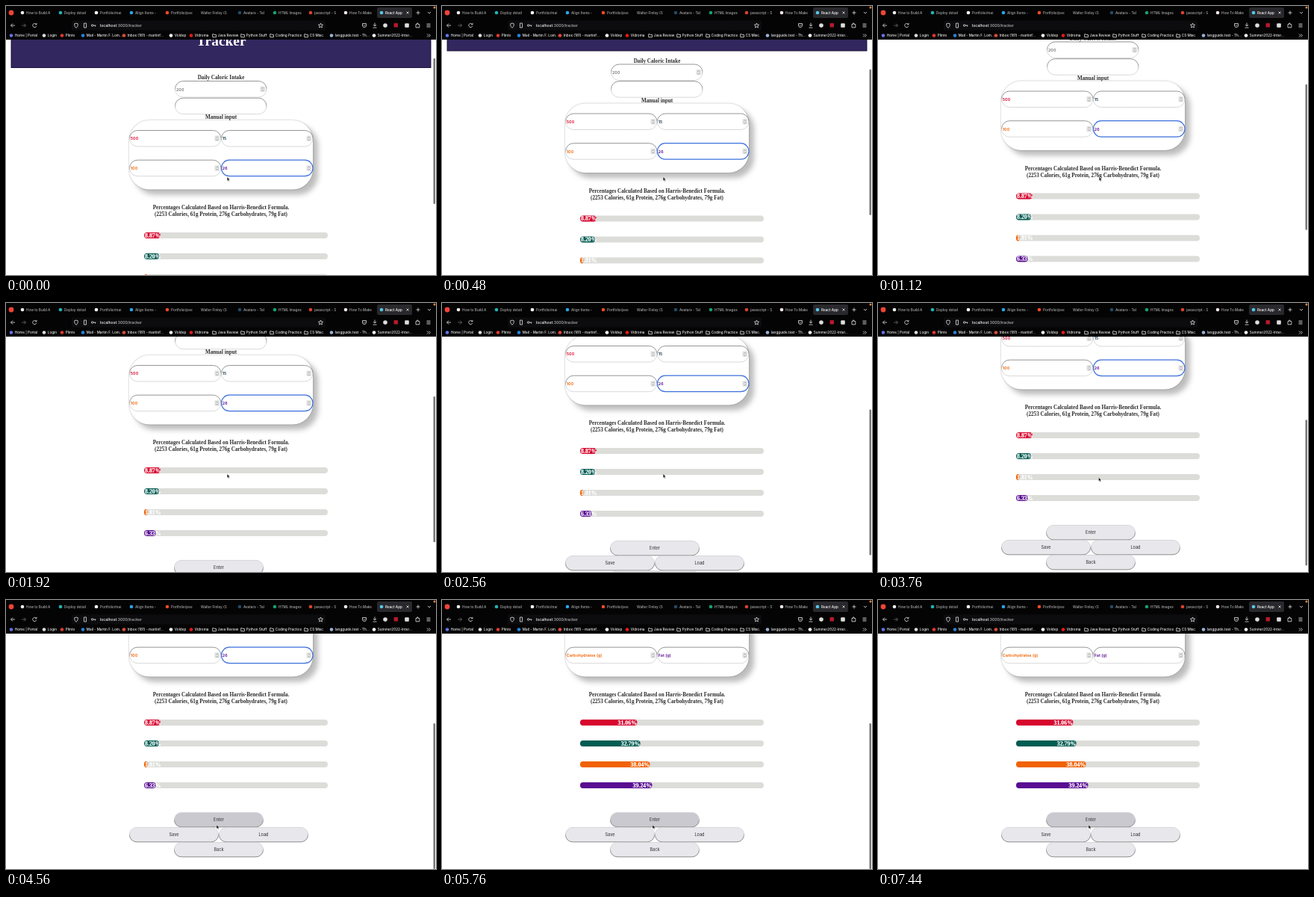
An HTML page for the animation above (7520 ms loop, 576 by 360 pixels).

```html
<!DOCTYPE html>
<html lang="en">
<head>
<meta charset="utf-8">
<title>Tracker</title>
<style>
  html, body { margin: 0; width: 100%; height: 100%; overflow: hidden; background: #fff; }
  svg { display: block; width: 576px; height: 360px; }
  text { font: 500 4.65px Inter, "Liberation Sans", sans-serif; white-space: pre; }
  .head { font: bold 7.2px "Liberation Serif", "Noto Serif", serif; text-anchor: middle; fill: #2c2c2c; }
  .title { font-size: 19.4px; fill: #fff; }
  .label { font-size: 7.9px; fill: #fff; stroke: #fff; stroke-width: .2; text-anchor: end; }
  .field { font-size: 5.4px; font-weight: 600; }
  .button { font-size: 5.5px; fill: #444; text-anchor: middle; }
  .url { font-size: 5.1px; fill: #bbb; }
  .line { fill: none; stroke: #e6e6e6; stroke-width: .8; }
  .card { filter: drop-shadow(0 0 .8px rgba(0, 0, 0, .3)) drop-shadow(7px 7px 3.5px rgba(0, 0, 0, .26)); }
</style>
</head>
<body>
<svg viewBox="0 0 576 360">
  <defs>
    <linearGradient id="inset" x2="0" y2="1">
      <stop offset=".4" stop-color="#8a8a8a"/><stop offset=".65" stop-color="#d4d4d4"/>
    </linearGradient>
    <linearGradient id="outset" x2="0" y2="1">
      <stop offset=".4" stop-color="#d2d2d6"/><stop offset=".65" stop-color="#808080"/>
    </linearGradient>
  </defs>
  <g id="page"></g>
  <rect id="thumb" x="572.5" width="2.5" height="195" rx="1.2" fill="#777"/>
  <g id="chrome"></g>
  <path id="cursor" d="M0 0V5.2L1.2 4.1 2.1 6 3 5.6 2.2 3.8H3.8Z" fill="#111" stroke="#fff" stroke-width=".4"/>
</svg>
<script>
const LOOP = 7520, STEP = 80, CLICK = 4640;
const $ = id => document.getElementById(id);

const rect = (x, y, w, h, fill, r = 0, more = "") =>
  `<rect x="${x}" y="${y}" width="${w}" height="${h}" rx="${r}" fill="${fill}" ${more}/>`;
const text = (x, y, str, more = 'fill="#eee"') => `<text x="${x}" y="${y}" ${more}>${str}</text>`;
const dot = (x, y, fill, r = 2.3) => `<circle cx="${x}" cy="${y}" r="${r}" fill="${fill}"/>`;
const line = d => `<path class="line" d="${d}"/>`;

const RED = "#d7062e", TEAL = "#025c52", ORANGE = "#f06205", PURPLE = "#590d92";
const bars = [
  { color: RED, from: 8.87, to: 31.06 },
  { color: TEAL, from: 8.20, to: 32.79 },
  { color: ORANGE, from: 1.81, to: 38.04 },
  { color: PURPLE, from: 6.33, to: 39.24 }
];
const fields = [
  { x: 165, y: 23, color: RED, value: "500", hint: "Calories" },
  { x: 288, y: 23, color: "#1d4350", value: "15", hint: "Protein (g)" },
  { x: 165, y: 62.7, color: ORANGE, value: "100", hint: "Carbohydrates (g)" },
  { x: 288, y: 62.7, color: PURPLE, value: "26", hint: "Fat (g)" }
];

function input(x, y, id = "") {
  return rect(x + .5, y + .5, 122.5, 21.5, "#fff", 10.7, `stroke="url(#inset)" stroke-width=".9" id="${id}"`);
}
function spinner(x, y) {
  return rect(x + 114.5, y + 7.5, 6.5, 7.5, "#e2e2e2", 1) +
    `<path d="M${x + 116.3} ${y + 10.6}l1.5-1.5 1.5 1.5m-3 1.7l1.5 1.5 1.5-1.5" fill="none" stroke="#888" stroke-width=".6"/>`;
}
function button(x, y, str, id = "") {
  return rect(x + .4, y + .4, 119.2, 19.4, "#e7e7ec", 9.7, `stroke="url(#outset)" stroke-width=".9" id="${id}"`) +
    text(x + 60, y + 12, str, 'class="button"');
}

// Page content, placed where it sits when scrolled to the bottom
function buildPage() {
  const head = (y, str) => text(288, y, str, 'class="head"');
  let s = rect(7, -140, 562, 79.5, "#32275f", 0, 'stroke="#120c30" stroke-width=".9"') +
    text(288.3, -90.5, "Tracker", 'class="head title"') +
    head(-45, "Daily Caloric Intake") +
    input(226, -43) + spinner(226, -43) + text(228, -29.5, "200", 'class="field" fill="#777"') +
    input(226, -20.3) +
    head(8.2, "Manual input") +
    `<g class="card">${rect(165, 10, 246, 92.5, "#fff", 27)}</g>`;
  fields.forEach((f, i) => {
    s += input(f.x, f.y, "input" + i) + spinner(f.x, f.y) +
      text(f.x + 1.8, f.y + 13.3, "", `class="field" fill="${f.color}" id="field${i}"`);
  });
  s += head(129, "Percentages Calculated Based on Harris-Benedict Formula.") +
    head(138, "(2253 Calories, 61g Protein, 276g Carbohydrates, 79g Fat)");
  bars.forEach((b, i) => {
    const y = 160 + 28 * i;
    s += rect(185, y, 246, 8, "#dcdcd9", 4) + rect(185, y, 0, 8, b.color, 4, `id="fill${i}"`) +
      text(0, y + 6.5, "", `class="head label" id="label${i}"`);
  });
  return s + button(225, 284, "Enter", "enter") + button(165, 304, "Save") +
    button(285, 304, "Load") + button(225, 324, "Back");
}

function buildChrome() {
  const tabs = [
    [22, "#eee", "How to Build A"], [73, "#20b5b5", "Deploy detail"], [121, "#fff", "Portfolio/mai"],
    [168, "#2aa5e8", "Align Items -"], [216, "#f04a24", "Portfolio/pee"], [256, "", "Walter Finley (S"],
    [313, "#244a66", "Avatars - Tal"], [360, "#16a077", "HTML Images"], [408, "#d9422c", "javascript - S"],
    [455, "#f2e6e6", "How To Make"], [503, "#54c8e8", "React App"]
  ];
  const marks = [
    [7, "#6474e8", "Home | Portal"], [51, "#ddd", "Login"], [75, "#e13a2b", "Plinto"],
    [103, "#2585da", "Mail - Martin F. Lom..."], [158, "#e04a3c", "Inbox (181) - martinf..."],
    [221, "#fff", "Voldep"], [248, "#f01818", "Vidroma"], [279, "", "Java Review"], [317, "", "Python Stuff"],
    [356, "", "Coding Practice"], [402, "", "CS Misc."], [436, "#9ab4d8", "langguide.test - Th..."],
    [493, "#fff", "Summer2022-Inter..."]
  ];
  let s = rect(0, 0, 576, 45, "#040405") + rect(88, 19.5, 340, 13, "#0c0c0e", 2) +
    rect(497, 2, 47, 14, "#29292d", 2) + dot(7, 9, "#ef4438", 3.4) + dot(574, 2, "#f0883a", 1.5);
  for (const [x, color, str] of tabs)
    s += (color && dot(x, 9, color)) + text(x + 5, 10.6, str, `fill="${x === 503 ? "#fff" : "#aaa"}"`);
  s += line("M536.5 7.5l3 3m0-3l-3 3M549.5 9h5m-2.500-2.500v5M565 8l2 2 2-2");

  s += line("M12 26H6.500m2.500-2.500L6.500 26 9 28.500") +
    `<g opacity=".45">${line("M21 26h5.500m-2.500-2.500l2.500 2.500-2.500 2.500")}</g>` +
    line("M40.500 24.500a2.600 2.600 0 1 0 .3 2.300M41 22.800v2h-2") +
    line("M94 23l2.300.8c0 3-.6 4.500-2.300 5.400-1.700-.9-2.300-2.400-2.300-5.400z") +
    line("M104.500 23h3v6h-3zM120.500 26h-3.500m2.500 0v1.500m-2.500-1.500a1.300 1.300 0 1 0-2.600 0a1.300 1.300 0 1 0 2.600 0") +
    text(126, 27.8, '<tspan fill="#fff">localhost</tspan>:3000/tracker', 'class="url"') +
    line("M421.500 23l.9 2 2.200.2-1.700 1.500.5 2.200-1.900-1.100-1.900 1.100.5-2.200-1.700-1.500 2.200-.2z") +
    line("M477.500 23.500h5v2.500a2.500 2.500 0 0 1-5 0zM478.800 25.300l1.200 1.200 1.200-1.200") +
    line("M494 22.500v4.500m-2-2l2 2 2-2m-4.500 4h5") +
    dot(508, 26, "#ddd", 2.8) + rect(519.5, 23, 5.500, 5.500, "#b5192b", 1) + rect(534.2, 23.2, 5.600, 5.600, "#ddd", 1) +
    line("M549 24.500h1.500v-1.500h1.500v1.500h1.800v4.300H549z") + line("M563.500 24h5m-5 2h5m-5 2h5");

  for (const [x, color, str] of marks)
    s += (color ? dot(x, 39.500, color) : line(`M${x - 2.3} 37.700h1.800l.6.800h2.500v3.100h-4.900z`)) + text(x + 4.800, 41.2, str);
  return s + line("M564 37.500l2 2-2 2m2.500-4l2 2-2 2");
}

// Linear interpolation through [time, value] points
function along(t, pts) {
  const i = pts.findIndex(p => p[0] > t);
  if (i < 0) return pts[pts.length - 1][1];
  if (!i) return pts[0][1];
  const [t0, a] = pts[i - 1], [t1, b] = pts[i];
  return a + (b - a) * (t - t0) / (t1 - t0);
}
const easeInOut = p => p * p * (3 - 2 * p);

function set(id, attrs) {
  for (const k in attrs) $(id).setAttribute(k, attrs[k]);
}

function draw(t) {
  const rest = along(t, [[0, 143], [1120, 90.5], [1920, 60], [2560, 34], [3760, 13], [4000, 0]]);
  set("page", { transform: `translate(0 ${rest})` });
  set("thumb", { y: 165 - rest * .665, opacity: along(t, [[5760, 1], [6080, 0]]) });

  const x = along(t, [[3200, 296.2], [3760, 295.5], [4080, 295.5], [4560, 282]]);
  const y = along(t, [[3200, 228.8], [3760, 233.5], [4080, 233.5], [4560, 301]]);
  set("cursor", { transform: `translate(${x} ${y})` });
  set("enter", { fill: y > 284 ? "#c9c9cf" : "#e7e7ec" });

  const clicked = t >= CLICK;
  fields.forEach((f, i) => { $("field" + i).textContent = clicked ? f.hint : f.value; });
  set("input3", clicked
    ? { stroke: "url(#inset)", "stroke-width": .9 }
    : { stroke: "#3d70dc", "stroke-width": 1.2 });

  const p = easeInOut(Math.min(1, Math.max(0, (t - CLICK) / 960)));
  bars.forEach((b, i) => {
    const w = 2.46 * (b.from + (b.to - b.from) * p), label = $("label" + i);
    label.textContent = (clicked ? b.to : b.from).toFixed(2) + "%";
    set("fill" + i, { width: w });
    label.setAttribute("x", 185 + Math.max(w - .3, 1 + label.getComputedTextLength()));
  });
}

$("page").innerHTML = buildPage();
$("chrome").innerHTML = buildChrome();
const start = performance.now();
function tick() {
  const t = (performance.now() - start) % LOOP;
  draw(Math.floor(t / STEP) * STEP);
  requestAnimationFrame(tick);
}
tick();
</script>
</body>
</html>
```
